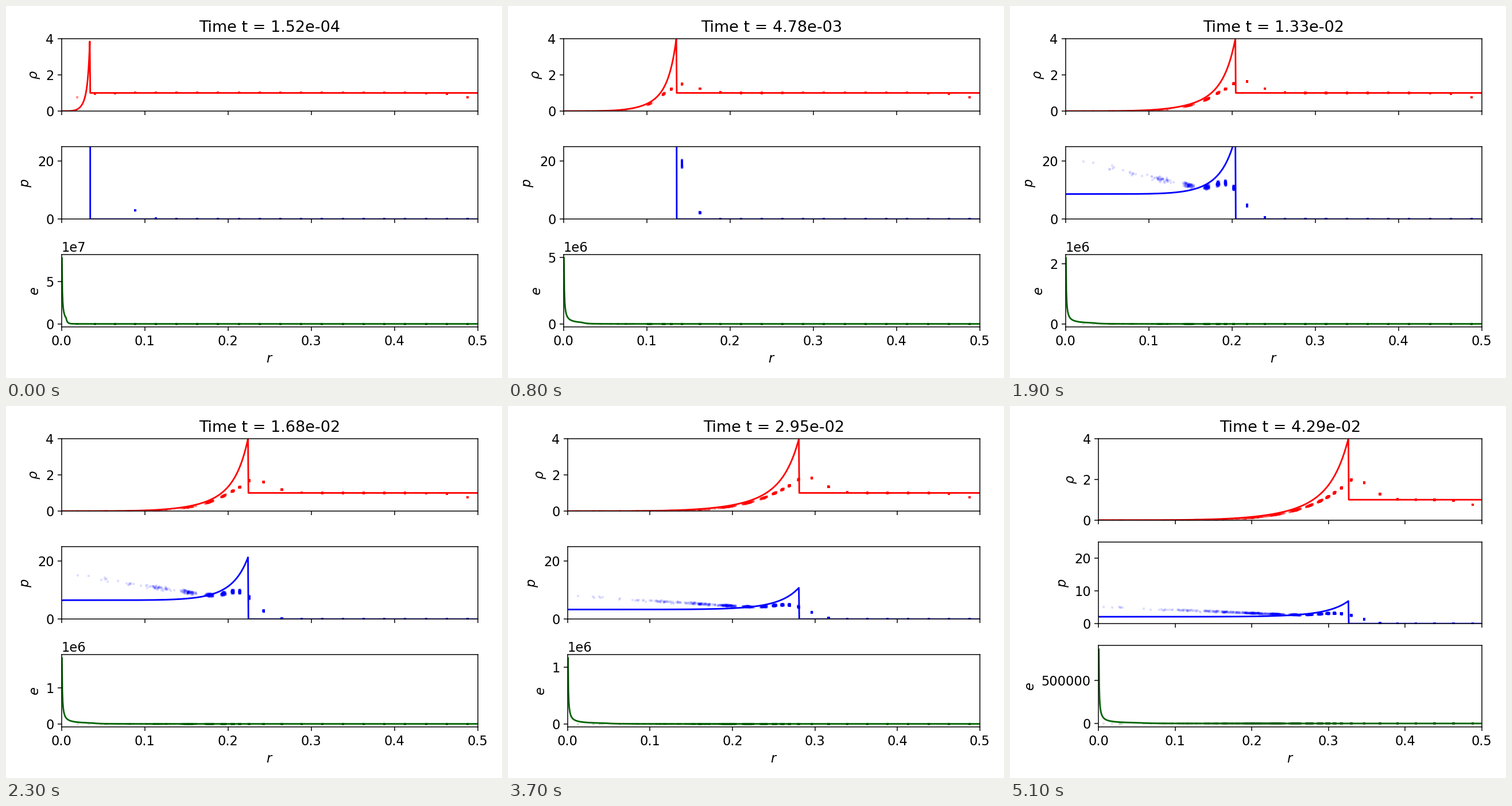
A matplotlib script that plays this animation: 864 px wide and 648 px high, repeating every 5.2 s.

```python
import numpy as np
import matplotlib.pyplot as plt
from matplotlib.animation import FuncAnimation

FRAMES, INTERVAL = 52, 100
GAMMA = 5 / 3
T_END, R_END = 0.0429, 0.326
E_PEAK, R_MIN = 8.58e5, 0.0005   # energy cap at T_END and the radius it applies to
SHELLS, CELL = 20, 0.025

plt.rcParams.update({"font.family": "DejaVu Sans", "font.size": 12})

# ---- clock: simulated time against frame number ----
KNOTS = np.array([0, 8, 15, 23, 31, 44, 51])
TIMES = np.array([0.152, 4.78, 9.95, 16.8, 23.9, 36.2, 42.9]) * 1e-3
RATES = np.gradient(TIMES, KNOTS, edge_order=2)


def sim_time(i):
    """Smooth Hermite curve through the knots."""
    k = min(np.searchsorted(KNOTS, i, side="right") - 1, len(KNOTS) - 2)
    h = KNOTS[k + 1] - KNOTS[k]
    u = (i - KNOTS[k]) / h
    a, b = TIMES[k], TIMES[k + 1]
    return (a + (b - a) * u * u * (3 - 2 * u)
            + h * u * (1 - u) * (RATES[k] * (1 - u) - RATES[k + 1] * u))


# ---- self-similar blast wave ----
def blast_profile():
    """Radius, density and pressure of the blast, scaled to the shock."""
    g = GAMMA
    n1 = -(13 * g * g - 7 * g + 12) / ((3 * g - 1) * (2 * g + 1))
    n2 = 5 * (g - 1) / (2 * g + 1)
    w = np.linspace(0.01, 1, 2000) ** 6.5
    v = (1 + w * (g - 1) / (g + 1)) / g
    b = (g + 1) / (7 - g) * (5 - (3 * g - 1) * v)
    c = (g + 1) / (g - 1) * (1 - v)
    xi = (((g + 1) * v / 2) ** -2 * b ** n1 * w ** n2) ** 0.2
    rho = ((g + 1) / (g - 1) * w ** (3 / (2 * g + 1))
           * b ** (-n1 / (2 - g)) * c ** (-2 / (2 - g)))
    z = g * (g - 1) * (1 - v) * v * v / (2 * (g * v - 1))
    p = rho * z * xi ** 2
    return xi, rho, p / p[-1]


XI, RHO, P = blast_profile()
r = np.linspace(0, 0.5, 1001)


def exact(t, shock, p_shock):
    inside = r <= shock
    rho = np.where(inside, np.interp(r / shock, XI, RHO), 1)
    p = np.where(inside, p_shock * np.interp(r / shock, XI, P), 0)
    peak = E_PEAK * (T_END / t) ** 0.8
    e = np.full_like(r, np.nan)
    e[1:] = np.minimum(p[1:] / ((GAMMA - 1) * rho[1:]), peak * R_MIN / r[1:])
    return rho, p, e, peak


# ---- particles on spherical shells ----
rng = np.random.default_rng(4)
edges = CELL * np.arange(SHELLS + 1)
centroid = 0.75 * np.diff(edges ** 4) / np.diff(edges ** 3)
k = np.arange(SHELLS)
shell = np.repeat(k, np.minimum(10 * k ** 2 + 4, 160))
r0 = centroid[shell]
rest_rho = 1 - 0.24 * 7.0 ** -np.minimum(shell, SHELLS - 1 - shell)
rest_p = 3 * 20.0 ** (3 - shell)
noise_r, noise_rho, noise_p = np.clip(rng.normal(size=(3, len(r0))), -2, 2)


def bell(x, center, width):
    return np.exp(-((x - center) / width) ** 2)


def pushed(s):
    """Where matter from radius s ends up, both in units of the shock radius."""
    swept = 0.955 * np.tanh(2.1 * s + 0.95 * s ** 3)
    return (swept ** 12 + s ** 12) ** (1 / 12)


def smeared_density(x, size):
    rise = 1.85 * x ** 5.7
    rise = np.where(rise > 1, 1 + (rise - 1) * size ** 0.8, rise)
    front = 1 + size ** 0.8 * bell(x, 1.025, 0.09 / size)
    return np.minimum(rise, front)


def smeared_pressure(x, size):
    core = np.maximum(0.75 - 0.47 * x, 0) + 0.16 * bell(x, 0.96, 0.1)
    return core / (1 + np.exp(np.minimum((x - 1.08) * size / 0.028, 50)))


def particles(i, shock, p_shock):
    ramp = min(1, i / 5)
    size = shock / R_END
    s = r0 / shock
    spread = 0.2 * np.exp(-5.8 * s) * noise_r
    pos = r0 + ramp * (np.abs(pushed(s) + spread) * shock - r0)

    x = pos / shock
    rho = smeared_density(x, size) * (1 + 0.05 * noise_rho * np.exp(-2 * s))
    p = p_shock * smeared_pressure(x, size) * (1 + 0.035 * noise_p)
    return pos, rest_rho * (1 + ramp * (rho - 1)), rest_p + ramp * (p - rest_p)


# ---- figure ----
fig, axes = plt.subplots(3, 1, sharex=True, figsize=(6.4, 4.8), dpi=135)
STYLES = [("r", "r", r"$\rho$"), ("b", "b", "$p$"), ("#006400", "#004800", "$e$")]
lines, dots = [], []
for ax, (line_color, dot_color, name) in zip(axes, STYLES):
    dots += ax.plot([], [], "s", color=dot_color, ms=2, mew=0, alpha=0.12)
    lines += ax.plot([], [], color=line_color, lw=1.5)
    ax.set_ylabel(name)
axes[0].set(xlim=(0, 0.5), ylim=(0, 4))
axes[1].set_ylim(0, 25)
axes[2].set_xlabel("$r$")


def draw(i):
    t = sim_time(i)
    shock = R_END * (t / T_END) ** 0.4
    p_shock = 2 / (GAMMA + 1) * (0.4 * shock / t) ** 2
    rho, p, e, peak = exact(t, shock, p_shock)
    pos, rho_dots, p_dots = particles(i, shock, p_shock)
    for line, y in zip(lines, (rho, p, e)):
        line.set_data(r, y)
    for dot, y in zip(dots, (rho_dots, p_dots, np.zeros_like(pos))):
        dot.set_data(pos, y)
    axes[2].set_ylim(-0.05 * peak, 1.05 * peak)
    axes[0].set_title(f"Time t = {t:.2e}")
    # lay out afresh, so tick choices do not depend on the previous frame
    fig.subplots_adjust(left=0.125, right=0.9, bottom=0.11, top=0.88, hspace=0.2)
    fig.tight_layout(rect=(0, -0.0037, 1, 0.9982))
    return lines + dots


anim = FuncAnimation(fig, draw, frames=FRAMES, interval=INTERVAL,
                     init_func=lambda: draw(0), repeat=True, repeat_delay=0)
plt.show()
```
